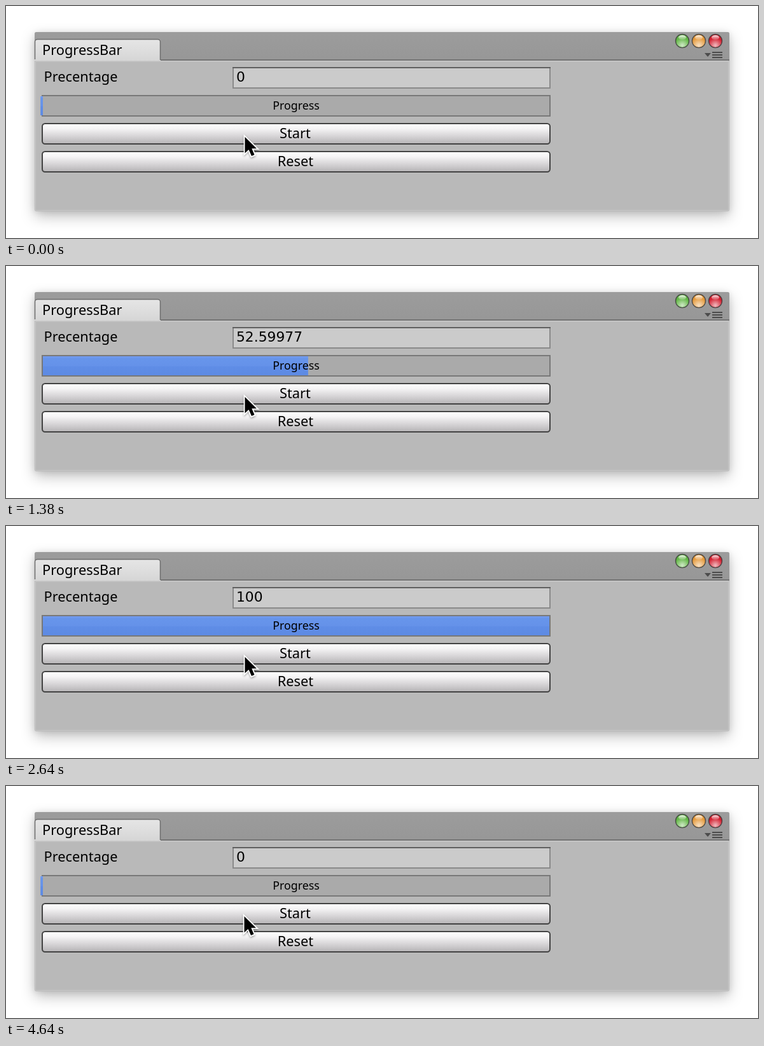
An HTML page for the animation above (4.68 s loop, 1182 px wide and 365 px high).

```html
<!DOCTYPE html>
<html lang="en">
<head>
<meta charset="utf-8">
<title>ProgressBar</title>
<style>
  html, body { margin: 0; width: 100%; height: 100%; overflow: hidden; background: #fff; }
  .window {
    position: absolute; left: 45px; top: 41px; width: 1092px; height: 282px;
    border-radius: 3px; background: #b9b9b9;
    box-shadow: 0 8px 22px rgba(0, 0, 0, .25), 0 1px 10px rgba(0, 0, 0, .1);
  }
  svg { position: absolute; left: 0; top: 0; display: block; }
  text { font: 21.8px "Noto Sans", sans-serif; fill: #000; }
  .mid { text-anchor: middle; }
  .small { font-size: 17.8px; }
  #value { font: 21.8px "DejaVu Sans", sans-serif; }
  .button rect { fill: url(#raised); stroke: #434343; stroke-width: 2; }
  .button.pressed rect { fill: url(#sunken); stroke: #595959; }
</style>
</head>
<body>
<div class="window"></div>
<svg width="1182" height="365" viewBox="0 0 1182 365">
  <defs>
    <linearGradient id="header" x2="0" y2="1">
      <stop offset="0" stop-color="#9c9c9c"/><stop offset="1" stop-color="#979797"/>
    </linearGradient>
    <linearGradient id="tab" x2="0" y2="1">
      <stop offset="0" stop-color="#e6e6e6"/><stop offset="1" stop-color="#d6d6d6"/>
    </linearGradient>
    <linearGradient id="raised" x2="0" y2="1">
      <stop offset="0" stop-color="#fff"/><stop offset=".25" stop-color="#f5f4f5"/>
      <stop offset=".6" stop-color="#d8d6d8"/><stop offset="1" stop-color="#b5b3b5"/>
    </linearGradient>
    <linearGradient id="sunken" x2="0" y2="1">
      <stop offset="0" stop-color="#6c6c6c"/><stop offset=".15" stop-color="#888"/>
      <stop offset=".5" stop-color="#959595"/><stop offset="1" stop-color="#9a9a9a"/>
    </linearGradient>
    <linearGradient id="blue" x2="0" y2="1">
      <stop offset="0" stop-color="#739cf0"/><stop offset=".12" stop-color="#6795eb"/>
      <stop offset=".5" stop-color="#6592e9"/><stop offset=".55" stop-color="#5f8de6"/>
      <stop offset="1" stop-color="#5d8ae3"/>
    </linearGradient>
    <linearGradient id="gloss" x2="0" y2="1">
      <stop offset="0" stop-color="#fff" stop-opacity=".9"/>
      <stop offset="1" stop-color="#fff" stop-opacity=".1"/>
    </linearGradient>
    <radialGradient id="glow" cy=".85" r=".6">
      <stop offset="0" stop-color="#fff" stop-opacity=".7"/>
      <stop offset="1" stop-color="#fff" stop-opacity="0"/>
    </radialGradient>
    <filter id="soft" x="-50%" y="-50%" width="200%" height="200%">
      <feDropShadow dx="0" dy="1.5" stdDeviation="1.5" flood-opacity=".4"/>
    </filter>
    <g id="lamp">
      <circle r="10.5" stroke="#333" stroke-opacity=".75" stroke-width="1.4"/>
      <circle r="10" fill="url(#glow)"/>
      <ellipse cy="-5.5" rx="6" ry="3.6" fill="url(#gloss)"/>
    </g>
  </defs>

  <!-- window frame -->
  <path d="M45 86V44q0-3 3-3H1134q3 0 3 3V86Z" fill="url(#header)"/>
  <path d="M46.5 87V321.5H1135.5V87" fill="none" stroke="#c9c9c9"/>
  <path d="M45 84.9H1137" stroke="#707070" stroke-width="1.8"/>
  <path d="M46 86.8H1136" stroke="#c9c9c9" stroke-width="1.6"/>
  <path d="M45 86V56q0-4 4-4H239q4 0 4 4V86Z" fill="url(#tab)"/>
  <path d="M45.5 84V56q0-3.5 4-3.5H238.500q4 0 4 4V85" fill="none" stroke="#6e6e6e" stroke-width="1.5"/>
  <text x="57" y="77">ProgressBar</text>

  <use href="#lamp" x="1063" y="55" fill="#62b645"/>
  <use href="#lamp" x="1089" y="55" fill="#e59a3c"/>
  <use href="#lamp" x="1115" y="55" fill="#d31f2f"/>
  <path d="M1098 74h10l-5 6Z" fill="#4c4c4c"/>
  <path d="M1110 73h16m-16 4h16m-16 4h16" stroke="#4c4c4c" stroke-width="2"/>

  <!-- percentage field -->
  <text x="59.500" y="119">Precentage</text>
  <rect x="357" y="97" width="498" height="32" fill="#cbcbcb" stroke="#8a8a8a" stroke-width="2"/>
  <path d="M356 97H856" stroke="#606060" stroke-width="2"/>
  <text id="value" x="362" y="119">0</text>

  <!-- progress bar -->
  <rect x="57" y="141" width="798" height="32" fill="#aaa" stroke="#787878" stroke-width="2"/>
  <rect id="fill" x="54" y="142" width="4" height="30" fill="url(#blue)"/>
  <text class="mid small" x="456" y="163">Progress</text>

  <g class="button" id="start">
    <rect x="57" y="185" width="798" height="32" rx="4.500"/>
    <text class="mid" x="454.500" y="208">Start</text>
  </g>
  <g class="button" id="reset">
    <rect x="57" y="229" width="798" height="32" rx="4.500"/>
    <text class="mid" x="455" y="252">Reset</text>
  </g>

  <g id="cursor" filter="url(#soft)">
    <path d="M375.500 206V231.500L381.500 226L386 236L390.500 234L386.300 224.300H394Z"
      stroke="#fff" stroke-width="3.600" paint-order="stroke"/>
  </g>
</svg>
<script>
  const LOOP = 4680, STEP = 20;
  const CLICK_START = [20, 70], CLICK_RESET = [3260, 3350];
  const $ = id => document.getElementById(id);
  const value = $('value'), fill = $('fill'), cursor = $('cursor');

  // The counter adds 0.1 in single precision, so rounding drift shows in the digits.
  const sums = [0];
  for (let i = 1; i < 1000; i++) sums.push(Math.fround(sums[i - 1] + Math.fround(0.1)));

  const within = (t, [from, to]) => t >= from && t < to;
  const ease = (t, from, to) => {
    const p = Math.min(1, Math.max(0, (t - from) / (to - from)));
    return p * p * (3 - 2 * p);
  };

  function percentAt(t) {
    if (t >= CLICK_RESET[1]) return 0;
    const n = Math.max(0, Math.round((t - 68.2) * 0.4011));
    return n < 1000 ? sums[n] : 100;
  }

  function draw(t) {
    const v = percentAt(t);
    value.textContent = String(Number(v.toPrecision(7)));

    const end = 54.2 + 7.998 * v;
    fill.setAttribute('x', Math.min(58, end));
    fill.setAttribute('width', Math.abs(Math.min(end, 854) - 58));

    $('start').classList.toggle('pressed', within(t, CLICK_START));
    $('reset').classList.toggle('pressed', within(t, CLICK_RESET));

    const down = ease(t, 2760, 3240), up = ease(t, 4280, 4640);
    cursor.setAttribute('transform', `translate(${down - 2 * up} ${39 * down - 40 * up})`);
  }

  const begin = performance.now();
  function tick() {
    const t = (performance.now() - begin) % LOOP;
    draw(Math.floor(t / STEP) * STEP);
    requestAnimationFrame(tick);
  }
  draw(0);
  requestAnimationFrame(tick);
</script>
</body>
</html>
```
